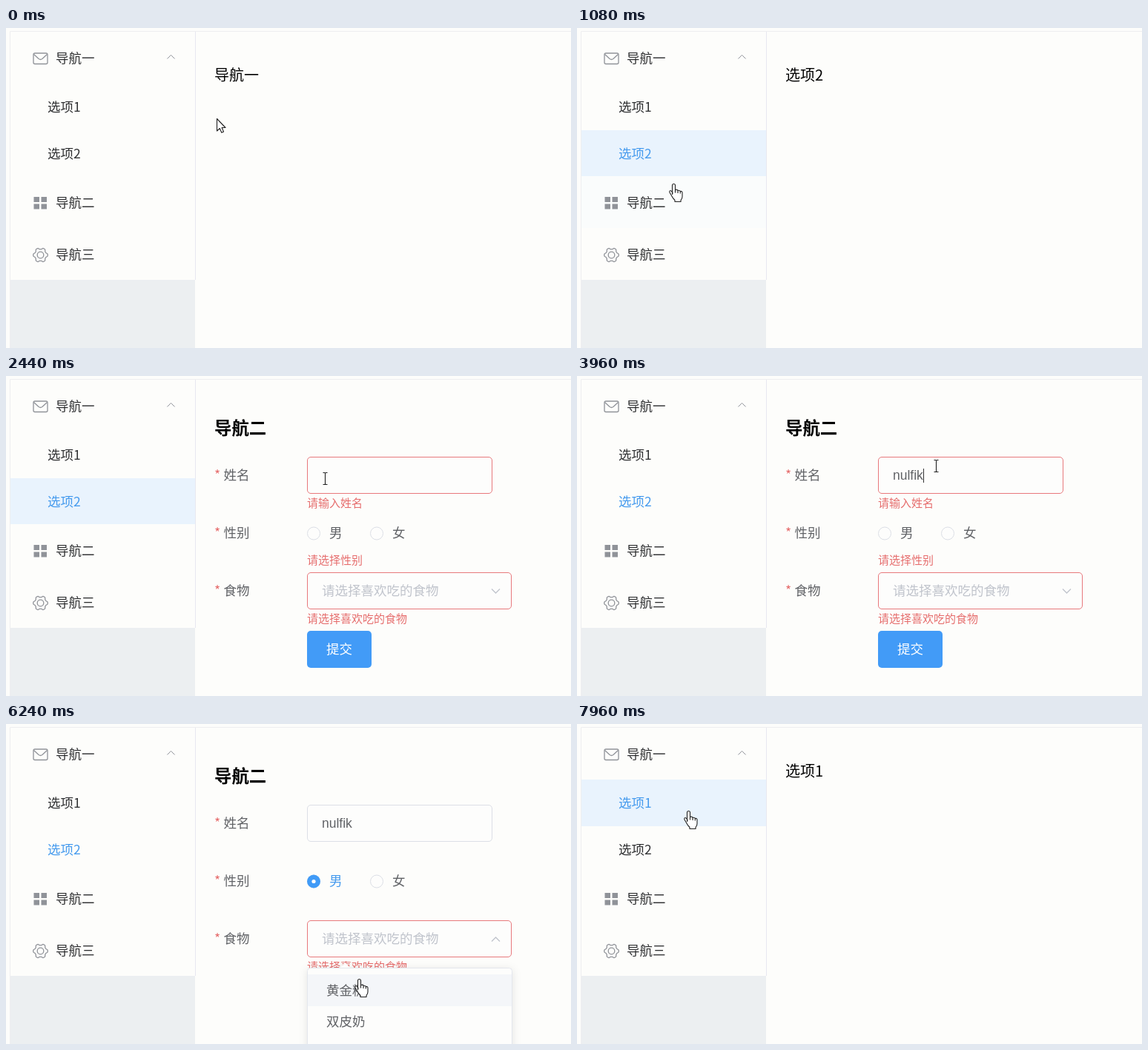
Animation, 762 px wide and 432 px high, one loop 8200 ms. Source, as an HTML page:

```html
<!DOCTYPE html>
<html lang="zh-CN">
<head>
<meta charset="utf-8">
<title>导航表单</title>
<style>
html, body { margin: 0; width: 100%; height: 100%; overflow: hidden; background: #fdfdfb; }
svg { display: block; width: 762px; height: 432px; }
text { font: 17.5px "Noto Sans CJK SC", "Noto Sans CJK", "Noto Sans", sans-serif; fill: #606266; }
.menu text { fill: #303133; }
.icon { fill: none; stroke: #909399; stroke-width: 1.3; }
.tint { fill: #e9f3fd; }
.star { fill: #e66d6d; }
.err text { font-size: 15px; fill: #e66d6d; }
.box { fill: #fdfdfc; }
.hint { fill: #c0c4cc; }
.thin { fill: none; stroke: #c0c4cc; stroke-width: 1.3; }
.radio { fill: #fdfdfc; stroke: #dcdfe6; }
#page { font-size: 20px; fill: #000; }
#title { font-size: 23.4px; font-weight: 700; fill: #000; }
#name { font-family: "Liberation Sans", Arial, sans-serif; }
#list { filter: drop-shadow(0 2px 6px rgba(0, 0, 0, .1)); }
#cursor path { fill: #fff; stroke: #222; stroke-width: 1.1; stroke-linejoin: round; }
</style>
</head>
<body>
<svg viewBox="0 0 762 432">
  <path d="M5 340H255V432H5z" fill="#eceff1"/>
  <path d="M5.5 432V4.5H762" fill="none" stroke="#eeeef0"/>
  <path d="M255.5 5V340" stroke="#e8e8f0"/>
  <g class="menu">
    <rect id="tint1" class="tint" x="6" y="75" width="249" height="63"/>
    <rect id="tint2" class="tint" x="6" y="138" width="249" height="62"/>
    <rect id="tint3" class="tint" x="6" y="200" width="249" height="70"/>
    <g class="icon">
      <rect x="37" y="34" width="19" height="14.5" rx="2"/>
      <path d="M37.5 35.5L44 41.5Q46.5 43.5 49 41.5L55.5 35.5"/>
      <path d="M217.500 41.500L222.500 36.500L227.500 41.500" stroke-width="1"/>
      <path id="gear"/>
      <circle cx="46.5" cy="306.5" r="4.3"/>
    </g>
    <path d="M37.5 228h7.5v7h-7.5zM47.5 228h7.5v7h-7.5zM37.5 237.5h7.5v7h-7.5zM47.5 237.5h7.5v7h-7.5z" fill="#909399"/>
    <text x="67" y="47">导航一</text>
    <text id="item1" x="56" y="113">选项1</text>
    <text id="item2" x="56" y="176">选项2</text>
    <text x="67" y="242">导航二</text>
    <text x="67" y="312">导航三</text>
  </g>
  <text id="page" x="281" y="71"></text>
  <g id="form">
    <text id="title" x="281" y="79">导航二</text>
    <text class="star" x="281" y="140">*</text>
    <text class="star" x="281" y="218">*</text>
    <text class="star" x="281" y="296">*</text>
    <text x="293.5" y="140">姓名</text>
    <text x="293.5" y="218">性别</text>
    <text x="293.5" y="296">食物</text>
    <rect id="nameBox" class="box" x="406.5" y="109.5" width="249" height="49" rx="4.5"/>
    <text id="name" x="426" y="140"></text>
    <path id="caret" d="M0 125V144" stroke="#333"/>
    <circle class="radio" cx="415" cy="212.5" r="8.5"/>
    <circle class="radio" cx="500" cy="212.5" r="8.5"/>
    <g id="picked"><circle cx="415" cy="212.5" r="9" fill="#409bf7"/><circle cx="415" cy="212.5" r="2.6" fill="#fff"/></g>
    <text id="male" x="436" y="218">男</text>
    <text x="521" y="218">女</text>
    <rect id="foodBox" class="box" x="406.5" y="265.5" width="275" height="49" rx="4.5"/>
    <text id="food" x="426" y="296"></text>
    <path id="arrow" class="thin" d="M-5.5 -3L0 2.5L5.5 -3"/>
    <g class="err">
      <text id="nameErr" x="406" y="177">请输入姓名</text>
      <text id="sexErr" x="406" y="254">请选择性别</text>
      <text id="foodErr" x="406" y="333">请选择喜欢吃的食物</text>
    </g>
    <rect x="406" y="344" width="87" height="50" rx="5" fill="#429bf7"/>
    <text x="432" y="375" style="fill:#fff">提交</text>
    <g id="list">
      <path d="M450 330L457.5 322L465 330z" fill="#fdfdfc"/>
      <rect x="406.5" y="329.5" width="276" height="240" rx="4" fill="#fdfdfc" stroke="#e4e7ed"/>
      <rect x="407" y="338" width="275" height="43" fill="#f4f6f9"/>
      <text x="432" y="366">黄金糕</text>
      <text x="432" y="408">双皮奶</text>
    </g>
  </g>
  <g id="cursor">
    <path id="pointer" d="M0 0V16.5L3.8 13L6.3 18.7L9 17.5L6.6 12H11.5z"/>
    <g id="hand">
      <path d="M-2 14V2q0-2 2-2t2 2v6q3-1 3.5 1 2.5-.8 3.3 1 2.7-.5 2.7 2v5q0 3-2 5v2h-8v-2q-3-3-5-7l-2-3.5q-.7-2 1-2.5 1-.2 3 3z"/>
      <path d="M2 8v4M5.5 9v3.5M8.8 10v3"/>
    </g>
    <path id="beam" style="fill:none" d="M-3 -8H-1Q0 -8 0 -7Q0 -8 1 -8H3M0 -7V7M-3 8H-1Q0 8 0 7Q0 8 1 8H3"/>
  </g>
</svg>
<script>
const LOOP = 8200, FADE = 300, USER = 'nulfik';
const DARK = '#303133', BLUE = '#469bee', GRAY = '#606266', PALE = '#dcdfe6', WARN = '#e8797c';
const CLICK = { item1: 440, item2: 780, nav2: 1280, submit: 1620, focus: 2640, radio: 4740,
  open: 5440, choose: 6400, back: 6960, last: 7600 };
// time, x, y of the mouse hotspot
const ROUTE = [[0, 284, 122], [320, 130, 108], [480, 130, 108], [720, 128, 172], [920, 128, 172],
  [1080, 130, 210], [1200, 132, 238], [1320, 132, 238], [1560, 450, 366], [1640, 450, 366],
  [1720, 446, 335], [2200, 430, 138], [2600, 430, 138], [3200, 484, 121], [4280, 484, 121],
  [4640, 415, 212], [4920, 415, 212], [5340, 480, 290], [5760, 480, 290], [6200, 476, 344],
  [6260, 476, 344], [6420, 476, 350], [6800, 140, 172], [7000, 140, 172], [7200, 149, 117],
  [7500, 149, 117], [7600, 150, 117], [LOOP, 150, 117]];

const $ = id => document.getElementById(id);
const clamp = v => Math.max(0, Math.min(1, v));
const fade = (t, on, off = 1e5) => clamp((t - on) / FADE) * (1 - clamp((t - off) / FADE));
const mix = (a, b, k) => `color-mix(in srgb, ${b} ${k * 100}%, ${a})`;
const show = (id, on) => { $(id).style.display = on ? '' : 'none'; };
const within = (x, y, l, t, r, b) => x >= l && x <= r && y >= t && y <= b;

function mouse(t) {
  const i = Math.max(1, ROUTE.findIndex(p => p[0] > t));
  const [t0, x0, y0] = ROUTE[i - 1], [t1, x1, y1] = ROUTE[i];
  const u = (t - t0) / (t1 - t0), k = u * u * (3 - 2 * u);
  return [x0 + (x1 - x0) * k, y0 + (y1 - y0) * k];
}

// opacity plus vertical growth from the top edge
function zoom(id, k, top) {
  show(id, k > 0);
  $(id).style.opacity = k;
  $(id).setAttribute('transform', `translate(0 ${top * (1 - k)}) scale(1 ${k})`);
}

function drawMenu(t) {
  $('tint1').style.opacity = Math.max(fade(t, 230, 580), fade(t, 7120));
  $('tint2').style.opacity = Math.max(fade(t, 600, 2600), fade(t, 6760, 7220));
  $('tint3').style.opacity = fade(t, 1040, 1390);
  const first = Math.max(fade(t, CLICK.item1, CLICK.item2), fade(t, CLICK.last));
  $('item1').style.fill = mix(DARK, BLUE, first);
  $('item2').style.fill = mix(DARK, BLUE, fade(t, CLICK.item2, CLICK.last));
}

function drawForm(t) {
  const nameBad = fade(t, CLICK.submit, CLICK.radio);
  const foodBad = fade(t, CLICK.submit, CLICK.choose);
  zoom('nameErr', nameBad, 163);
  zoom('sexErr', nameBad, 240);
  zoom('foodErr', foodBad, 319);
  $('nameBox').style.stroke = mix(PALE, WARN, nameBad);
  $('foodBox').style.stroke = mix(PALE, WARN, foodBad);

  const typed = USER.slice(0, Math.max(0, Math.floor((t - 3360) / 80)));
  $('name').textContent = typed;
  const typing = t > 3400 && t < 4100;
  show('caret', t > CLICK.focus && t < CLICK.radio && (typing || t % 1000 < 500));
  const end = typed ? $('name').getComputedTextLength() : 0;
  $('caret').setAttribute('transform', `translate(${Math.round(426 + end) + .5} 0)`);

  const pick = fade(t, CLICK.radio);
  $('picked').style.opacity = pick;
  $('male').style.fill = mix(GRAY, BLUE, pick);

  const chosen = t >= CLICK.choose;
  $('food').textContent = chosen ? '黄金糕' : '请选择喜欢吃的食物';
  $('food').setAttribute('class', chosen ? '' : 'hint');
  const open = fade(t, CLICK.open, CLICK.choose);
  zoom('list', open, 329);
  $('arrow').setAttribute('transform', `translate(660.5 290.5) rotate(${180 * open})`);
}

function drawCursor(t, form) {
  const [x, y] = mouse(t);
  const beam = form && within(x, y, 406, 109, 656, 159);
  const hand = x < 255 || form && (within(x, y, 406, 203, 540, 222) ||
    within(x, y, 406, 265, 682, 315) || within(x, y, 406, 344, 493, 394) ||
    t > CLICK.open && t < CLICK.choose + FADE && within(x, y, 406, 329, 682, 432));
  show('beam', beam);
  show('hand', hand);
  show('pointer', !beam && !hand);
  $('cursor').setAttribute('transform', `translate(${Math.round(x) + .5} ${Math.round(y) + .5})`);
}

function draw(t) {
  const form = t >= CLICK.nav2 && t < CLICK.back;
  drawMenu(t);
  show('form', form);
  show('page', !form);
  $('page').textContent = t < CLICK.item1 ? '导航一' :
    t < CLICK.item2 || t >= CLICK.last ? '选项1' : '选项2';
  if (form) drawForm(t);
  drawCursor(t, form);
}

// six blunt teeth
$('gear').setAttribute('d', 'M' + Array.from({ length: 72 }, (_, i) => {
  const a = i * Math.PI / 36, r = 8.8 + Math.tanh(2 * Math.cos(6 * a));
  return [46.5 + r * Math.cos(a), 306.5 + r * Math.sin(a)].map(v => v.toFixed(2));
}).join('L') + 'z');

const start = performance.now();
function tick() {
  draw((performance.now() - start) % LOOP);
  requestAnimationFrame(tick);
}
tick();
</script>
</body>
</html>
```
